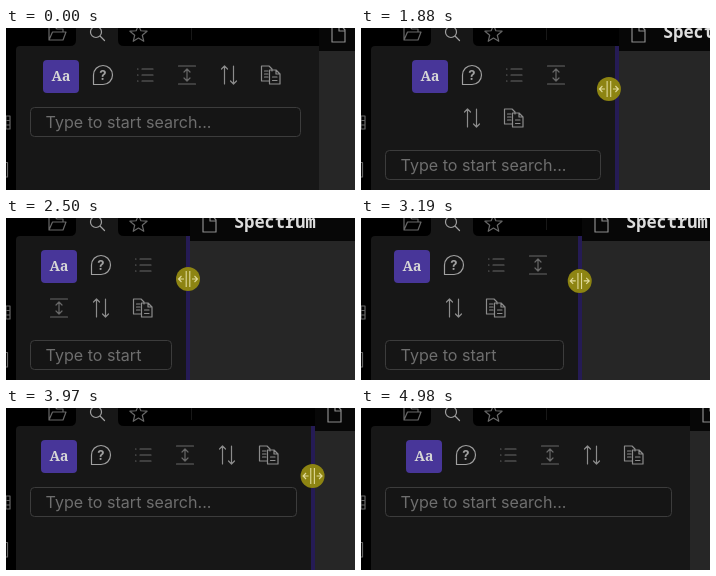
An HTML page that plays this animation: 349 by 162 pixels, repeating every 5.6 s.

```html
<!DOCTYPE html>
<html lang="en">
<head>
<meta charset="utf-8">
<title>Resizable search sidebar</title>
<style>
  html, body { margin: 0; width: 100%; height: 100%; overflow: hidden; background: #000; }
  svg { display: block; width: 100%; height: 100%; }
  .icon { fill: none; stroke: #8c8c8c; stroke-width: 1.2; stroke-linecap: round; stroke-linejoin: round; }
  .dim { stroke: #686868; }
  .bright { stroke: #a0a0a0; }
  .hint { font: 16.1px Inter, sans-serif; fill: #6e6e6e; }
  .title { font: bold 17px "Noto Sans Mono", monospace; fill: #dedede; }
  .case { font: bold 14px "Noto Serif", serif; fill: #d6d6d6; stroke: none; text-anchor: middle; }
  .help { font: bold 13px Inter, sans-serif; fill: #a0a0a0; stroke: none; text-anchor: middle; }
</style>
</head>
<body>
<svg viewBox="0 0 349 162">
  <rect width="349" height="162"/>

  <!-- left ribbon -->
  <path class="icon dim" d="M-4 88H4V101H-4M-4 92.5H4M-4 97H4M0 88V101M-4 134.5H1.5V149H-4"/>

  <!-- sidebar with its active tab -->
  <path d="M64 18Q70 18 70 12V0H112V12Q112 18 118 18Z" fill="#171717"/>
  <path d="M185.5 0V12" stroke="#181818"/>
  <path id="panel" fill="#171717"/>
  <g class="icon">
    <path class="dim" d="M43 12V-1H49L51 1H57V4M43 12L46.5 4H60L57 12Z"/>
    <path class="bright" d="M84.5 4a5.5 5.5 0 1 0 11 0a5.5 5.5 0 1 0 -11 0M94 8L98.5 12.5"/>
    <path id="star" class="dim"/>
  </g>

  <!-- editor -->
  <g id="editor">
    <rect x="2" width="349" height="23" fill="#070707"/>
    <rect x="2" y="23" width="349" height="139" fill="#262626"/>
    <path class="icon" d="M15 -4H23L28 2V14H15ZM22 -4V3H28"/>
    <text class="title" x="46" y="10">Spectrum</text>
  </g>
  <rect id="handle" x="-2" y="18" width="4" height="144" fill="#251b55"/>

  <!-- search options, each drawn around its own centre -->
  <g id="options" class="icon">
    <g>
      <rect x="-18" y="-15" width="36" height="33" rx="4" fill="#483699" stroke="none"/>
      <text class="case" y="5.5">Aa</text>
    </g>
    <g class="bright"><path d="M-9.5 9.5V0A9.5 9.5 0 1 1 0 9.5Z"/><text class="help" y="4.8">?</text></g>
    <g class="dim"><path d="M-3 -6H8M-3 0H8M-3 6H8M-7.5 -6h.5M-7.5 0h.5M-7.5 6h.5"/></g>
    <g class="dim"><path d="M-8.5 -9H8.5M-8.5 9H8.5M0 -5.5V5.5M-3 -3L0 -6L3 -3M-3 3L0 6L3 3"/></g>
    <g><path d="M-4.5 9V-9M-7.5 -6L-4.5 -9L-1.5 -6M4.5 -9V9M1.5 6L4.5 9L7.5 6"/></g>
    <g><path d="M-2 6H-9.5V-9H-2L1 -6V-4M-6.5 -4H-3M-6.5 -1H-3M-6.5 2H-3M-1.5 -5H5L9 -1V9H-1.5ZM5 -5V-1H9M1.5 2H6M1.5 5.5H6"/></g>
  </g>

  <g id="search">
    <rect id="field" x="24.5" y="79.5" height="29" rx="4" fill="#151515" stroke="#3c3c3c"/>
    <text id="hint" class="hint" x="39.5" y="100"></text>
  </g>

  <g id="cursor">
    <circle id="halo" r="12"/>
    <path fill="none" stroke="#e0da9a" stroke-width="1.1"
          d="M-1.8 -8V8M1.8 -8V8M-4 0H-9.5M4 0H9.5M-6.5 -3L-9.5 0L-6.5 3M6.5 -3L9.5 0L6.5 3"/>
  </g>
</svg>
<script>
const LOOP = 5600, START = 360, STEP = 78.2;
const PITCH = 42, ROW = 43;
const WIDE = 311, NARROW = 182, FINAL = 327;
const $ = id => document.getElementById(id);
const options = [...$('options').children];

// Progress from 0 to 1 between two steps; a power above 1 slows towards the end.
function ramp(step, from, to, power = 1) {
  const progress = Math.min(1, Math.max(0, (step - from) / (to - from)));
  return 1 - (1 - progress) ** power;
}

const move = (node, x, y) => node.setAttribute('transform', `translate(${x} ${y})`);

function layOut(edge) {
  const columns = Math.max(3, Math.min(options.length, Math.floor((edge - 50) / PITCH)));
  const centre = Math.floor((edge + 9) / 2);

  options.forEach((option, i) => {
    const row = Math.floor(i / columns);
    const inRow = Math.min(columns, options.length - row * columns);
    move(option, centre + (i % columns - (inRow - 1) / 2) * PITCH, 47 + row * ROW);
  });
  $('panel').setAttribute('d', `M10 162V22Q10 18 14 18H${edge + 2}V162Z`);
  move($('editor'), edge, 0);
  move($('handle'), edge, 0);
  move($('search'), 0, columns < options.length ? ROW : 0);
  $('field').setAttribute('width', edge - 41);
  $('hint').textContent = edge < 237 ? 'Type to start' : 'Type to start search...';
}

function draw(time) {
  const step = Math.floor((time - START) / STEP);
  const widen = (FINAL - NARROW) * ramp(step, 33, 52, 1.7);
  const narrow = WIDE - NARROW;
  layOut(Math.round(WIDE - narrow * ramp(step, 13, 27) + widen));

  // The pointer slides in, runs slightly ahead while narrowing, then drifts off.
  const enter = ramp(step, 0, 12), leave = ramp(step, 53, 59);
  const x = WIDE - 11 * (1 - enter) - narrow * ramp(step, 13, 27, 1.2) + widen + 7 * leave;
  const y = 62 - ramp(step, 13, 19) + 7 * ramp(step, 33, 44);
  move($('cursor'), x, y);
  $('cursor').setAttribute('opacity', ramp(step, -1, 7) - leave);
  $('handle').setAttribute('opacity', ramp(step, 3, 7) - leave);

  const pressing = step === 12 || step === 13;
  $('halo').setAttribute('fill', pressing ? '#a0960e' : '#8d8412');
}

const starPoints = Array.from({ length: 10 }, (_, i) => {
  const angle = i * Math.PI / 5, r = i % 2 ? 4 : 9;
  return `${132.5 + r * Math.sin(angle)} ${6 - r * Math.cos(angle)}`;
});
$('star').setAttribute('d', `M${starPoints.join('L')}Z`);

function tick() {
  draw(performance.now() % LOOP);
  requestAnimationFrame(tick);
}
tick();
</script>
</body>
</html>
```
